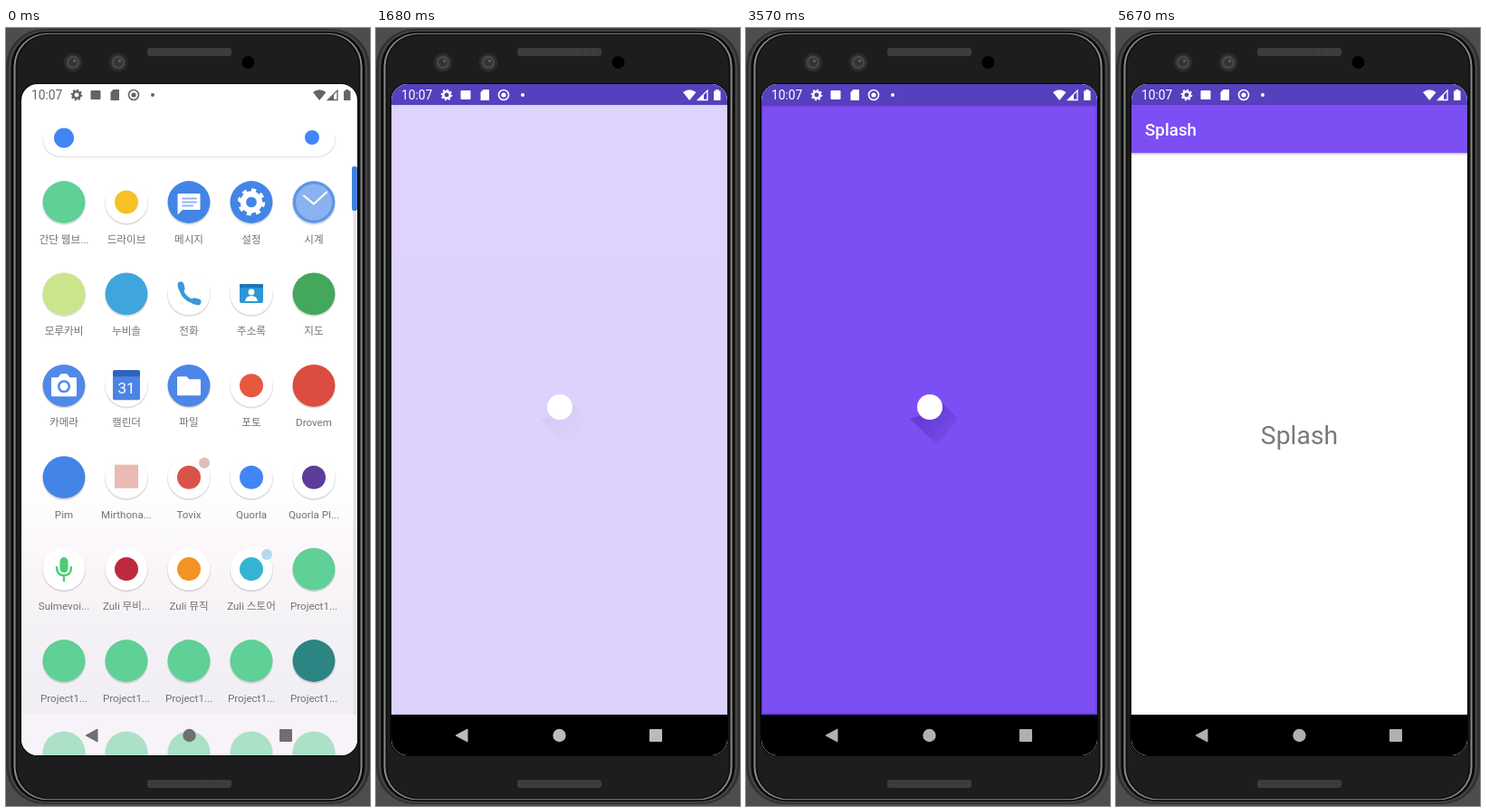
Recreate the animation shown at these times as an HTML page. Size 402 by 860 pixels, loop 5.74 s.

```html
<!DOCTYPE html>
<html lang="ko">
<head>
<meta charset="utf-8">
<title>Splash screen</title>
<style>
html, body { margin: 0; width: 100%; height: 100%; overflow: hidden; background: #4c4e4d; }
svg { display: block; width: 402px; height: 860px; }
text { font-family: Roboto, "Noto Sans CJK KR", "Noto Sans CJK", sans-serif; }
.label { font-size: 11.6px; fill: #727272; text-anchor: middle; }
</style>
</head>
<body>
<svg viewBox="0 0 402 860" xmlns="http://www.w3.org/2000/svg">
  <defs>
    <clipPath id="glass"><rect x="17" y="62" width="371" height="742" rx="18"/></clipPath>
    <clipPath id="content"><rect x="17" y="85" width="371" height="674"/></clipPath>
    <linearGradient id="wall" x2="0" y2="1">
      <stop offset=".6" stop-color="#fff"/>
      <stop offset=".72" stop-color="#faf5f9"/>
      <stop offset=".83" stop-color="#f3f1f5"/>
      <stop offset="1" stop-color="#efedf2"/>
    </linearGradient>
    <linearGradient id="cast" x2="1" y2="1">
      <stop offset=".3" stop-color="#3a1d9a" stop-opacity=".38"/>
      <stop offset="1" stop-color="#3a1d9a" stop-opacity="0"/>
    </linearGradient>
    <linearGradient id="drop" x2="0" y2="1">
      <stop stop-color="#000" stop-opacity=".25"/>
      <stop offset="1" stop-color="#000" stop-opacity="0"/>
    </linearGradient>
    <pattern id="mesh" width="3" height="3" patternUnits="userSpaceOnUse">
      <rect width="3" height="3" fill="#404040"/>
      <circle cx="1" cy="1" r=".8" fill="#2c2c2c"/>
    </pattern>
  </defs>

  <g id="phone"></g>
  <rect x="15.5" y="61" width="373.5" height="744" rx="19" fill="#050505"/>

  <g clip-path="url(#glass)">
    <g id="home"></g>
    <g id="app">
      <rect x="17" y="62" width="371" height="742" fill="#fff"/>
      <rect x="17" y="62" width="371" height="23" fill="#5540be"/>
      <rect x="17" y="759" width="371" height="45"/>
    </g>
    <g id="splash">
      <rect x="17" y="85" width="371" height="674" fill="#7c4ff4"/>
      <rect x="17.5" y="85.5" width="370" height="673" fill="none" stroke="#4a2fa6" stroke-width="2" opacity=".5"/>
      <path d="M193 428 212 409 234 432 211 461 181 432Z" fill="url(#cast)"/>
      <circle cx="203" cy="419" r="14" fill="#fff"/>
    </g>
    <g clip-path="url(#content)">
      <g id="main">
        <rect x="17" y="85" width="371" height="674" fill="#fff"/>
        <rect x="17" y="85" width="371" height="53" fill="#7c4ff4"/>
        <rect x="17" y="138" width="371" height="3" fill="url(#drop)"/>
        <text x="32" y="119" font-size="18.8" font-weight="500" fill="#fff">Splash</text>
        <text x="202.5" y="460" font-size="28.4" fill="#797979" text-anchor="middle">Splash</text>
      </g>
    </g>
    <g id="status"></g>
    <g id="nav">
      <path d="M88 782 101 775V789Z" stroke="currentColor" stroke-linejoin="round"/>
      <circle cx="202.5" cy="782" r="7.2"/>
      <rect x="302" y="775" width="14" height="14" rx="1"/>
    </g>
  </g>
</svg>
<script>
const $ = id => document.getElementById(id);
const circle = (x, y, r, fill, more = '') => `<circle cx="${x}" cy="${y}" r="${r}" fill="${fill}" ${more}/>`;
const rect = (x, y, w, h, fill, r = 0, more = '') =>
  `<rect x="${x}" y="${y}" width="${w}" height="${h}" rx="${r}" fill="${fill}" ${more}/>`;
const path = (d, fill, more = '') => `<path d="${d}" fill="${fill}" ${more}/>`;
const line = (d, color, width) =>
  path(d, 'none', `stroke="${color}" stroke-width="${width}" stroke-linecap="round" stroke-linejoin="round"`);
const gear = (x, y, s, color) =>
  circle(x, y, s * .6, 'none', `stroke="${color}" stroke-width="${s * .42}"`) +
  circle(x, y, s * .88, 'none', `stroke="${color}" stroke-width="${s * .26}" pathLength="16" stroke-dasharray="1 1"`);

// Phone body
const shell = [[0, '#303231'], [3, '#454746'], [5.5, '#090909'], [8.5, '#888a89'], [10.5, '#111'], [12.5, '#1d1d1d']];
const camera = x => circle(x, 38, 10.5, '#2b2b2b') + circle(x, 38, 7.5, '#454545') +
  circle(x, 38, 4.5, '#333') + circle(x + 1.5, 36.5, 1.4, '#666');
$('phone').innerHTML =
  shell.map(([d, c]) => rect(d, 1 + d * .55, 402 - 2 * d, 857 - d * 1.1, c, 42 - d * .6)).join('') +
  rect(156, 22, 93, 9, 'url(#mesh)', 3) + rect(156, 831, 93, 9, 'url(#mesh)', 3) +
  camera(74) + camera(124) + circle(267.5, 38, 7, '#000');

// Launcher
const blue = '#4285e6', green = '#5fd096';
const dot = (color, r = 13) => circle(0, 0, r, color);
const project = ['Project1...', green];
const apps = [
  ['간단 웹브...', green],
  ['드라이브', '#fff', dot('#f6c026')],
  ['메시지', blue, path('M-12-9H12V8H-7L-12 13Z', '#fff', 'stroke="#fff" stroke-linejoin="round"') +
    line('M-7-4H8M-7 0H8M-7 4H4', '#8db5f2', 1.8)],
  ['설정', blue, gear(0, 0, 15, '#fff')],
  ['시계', '#8ab2f0', circle(0, 0, 21.5, 'none', 'stroke="#5f94e8" stroke-width="3"') +
    line('M-11-7 0 2 14-11', '#fff', 2.2)],
  ['모루카비', '#cbe58c'],
  ['누비솔', '#3ea6dc'],
  ['전화', '#fff', line('M-9-10C-9 1-1 9 10 9', '#3a98dc', 4.5) +
    line('M-9-10-8-6M10 9 6 8', '#3a98dc', 7)],
  ['주소록', '#fff', rect(-13, -11, 26, 21, '#2f95d6', 2) + rect(-13, -11, 26, 4, '#1f74b4', 1) +
    circle(0, -2, 3.4, '#fff') + path('M-7 8Q-6 2 0 2T7 8Z', '#fff')],
  ['지도', '#43a85c'],
  ['카메라', '#5089e8', path('M-13-8H-6L-3-12H3L6-8H13V11H-13Z', '#fff', 'stroke="#fff" stroke-width="2" stroke-linejoin="round"') +
    circle(0, 1, 7, '#5089e8') + circle(0, 1, 4.5, '#fff')],
  ['캘린더', '#fff', rect(-15, -17, 30, 33, '#4c84e4', 2) + rect(-15, -17, 30, 7, '#2f62bd', 2) +
    '<text y="8.5" font-size="17" fill="#fff" text-anchor="middle">31</text>'],
  ['파일', '#4c86e6', path('M-12-9H-3L0-6H12V10H-12Z', '#fff', 'stroke="#fff" stroke-width="2" stroke-linejoin="round"')],
  ['포토', '#fff', dot('#e8583e')],
  ['Drovem', '#dc4c40'],
  ['Pim', blue],
  ['Mirthona...', '#fff', rect(-13, -14, 26, 26, '#eab9b4')],
  ['Tovix', '#fff', dot('#d9534a') + circle(17, -16, 6, '#e3bcbb')],
  ['Quorla', '#fff', dot('#4285f4')],
  ['Quorla Pl...', '#fff', dot('#5b3c98')],
  ['Sulmevoi...', '#fff', rect(-4.5, -13, 9, 17, '#4bcd72', 4.5) +
    line('M-8-2Q-8 7 0 7T8-2M0 7V13', '#4bcd72', 2.4)],
  ['Zuli 무비...', '#fff', dot('#bd2a3f')],
  ['Zuli 뮤직', '#fff', dot('#f39324')],
  ['Zuli 스토어', '#fff', dot('#35b4d2') + circle(17, -16, 6, '#b8d8ee')],
  project, project, project, project, project,
  ['Project1...', '#2c8583'],
  ...Array(5).fill(project)
];
const appIcon = ([label, fill, art = ''], i) => {
  const row = Math.floor(i / 5);
  return `<g transform="translate(${64 + i % 5 * 69} ${192.5 + row * 101.4})" opacity="${row > 5 ? .5 : 1}">` +
    circle(0, 1.3, 24, '#000', 'opacity=".13"') + circle(0, 0, 23.4, fill) + art +
    (row > 5 ? '' : `<text class="label" y="45">${label}</text>`) + '</g>';
};
$('home').innerHTML =
  rect(17, 62, 371, 742, 'url(#wall)') + rect(17, 759, 371, 45, '#f8f3f8') +
  rect(40.5, 104, 323.5, 39, '#000', 19.5, 'opacity=".13"') + rect(41, 102, 322.5, 40, '#fff', 20) +
  circle(64, 121.5, 11, '#4285f4') + circle(338, 121, 8, '#4285f4') +
  rect(383.5, 202, 4.5, 557, '#e3e2e7') + rect(382, 153, 6, 49, '#3f7fe0', 2) +
  apps.map(appIcon).join('');

// Status icons take their colour from the group
const ink = 'currentColor';
$('status').innerHTML =
  `<text x="28" y="79" font-size="13.8" fill="${ink}">10:07</text>` +
  gear(78, 74, 6.3, ink) + rect(93.5, 69, 11, 10, ink, 1) +
  path('M118.5 68H125V80H115.500V71Z', ink) +
  circle(141, 74, 5.5, 'none', `stroke="${ink}" stroke-width="1.6"`) + circle(141, 74, 2.6, ink) +
  circle(162, 74, 2, ink) +
  path('M339 71Q346 65.500 353.500 71L346.200 80Z', ink) +
  path('M355.500 79.500 366 69V79.500Z', 'none', `stroke="${ink}" stroke-width="1.3"`) +
  path('M355 80 362 73V80Z', ink) +
  path('M373 69.500H375V68H378.500V69.500H380.500V80H373Z', ink);

// Motion
const LOOP = 5740, STEP = 70;
const span = (t, from, to) => Math.min(1, Math.max(0, (t - from) / (to - from)));
const mix = (a, b, p) => a + (b - a) * p;
const easeOut = p => 1 - (1 - p) ** 4;
const gray = v => `rgb(${v},${v},${v})`;
const zoom = (el, s, y) =>
  el.setAttribute('transform', `translate(202.5 ${y}) scale(${s}) translate(-202.5 ${-y})`);

function draw(t) {
  const open = span(t, 140, 420);
  $('app').style.opacity = open;
  zoom($('app'), mix(.85, 1, easeOut(span(t, 140, 560))), 433);
  $('status').style.color = gray(mix(100, 255, open));

  const dim = mix(mix(255, 187, span(t, 980, 1400)), 176, span(t, 1680, 1890));
  $('nav').style.color = $('nav').style.fill = gray(open < 1 ? mix(111, 255, open) : dim);

  $('splash').style.opacity = span(t, 1470, 1890) ** 2;

  $('main').style.opacity = span(t, 4760, 4970);
  zoom($('main'), mix(.87, 1, easeOut(span(t, 4760, 5180))), 422);
}

const start = performance.now();
function tick() {
  const t = (performance.now() - start) % LOOP;
  draw(t - t % STEP);
  requestAnimationFrame(tick);
}
tick();
</script>
</body>
</html>
```
